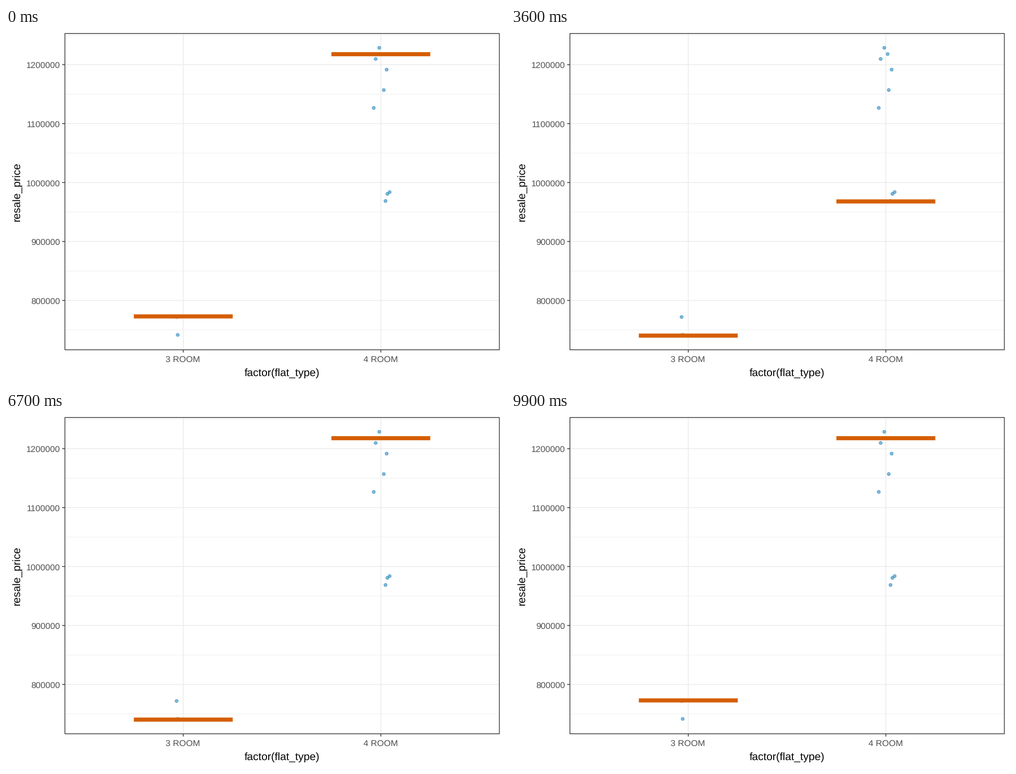
Animation of 885 by 632 pixels, one loop 10000 ms. Source, as a matplotlib script:

```python
import matplotlib.pyplot as plt
from matplotlib.animation import FuncAnimation
from matplotlib.patches import Circle, Rectangle

W, H, DPI = 885, 632, 64
PT = 72 / DPI  # points per pixel

plt.rcParams.update({
    "font.family": "Liberation Sans",
    "text.hinting": "none",
    "path.snap": False,
})

LEFT, RIGHT, TOP, BOTTOM = 104.5, 875.0, 9.7, 571.3
CENTERS = {"3 ROOM": 314.4, "4 ROOM": 664.8}
BAR_W, BAR_H = 175.4, 7.3
BLUE, ORANGE, DARK = "#0072B2", "#D55E00", "#333333"

POINTS = [
    (302.6, 513.0), (304.5, 544.8),
    (662.0, 35.2), (668.0, 46.3), (655.6, 54.9), (675.1, 73.9),
    (670.0, 110.2), (652.2, 141.8), (680.4, 291.3), (676.4, 294.5),
    (673.1, 307.1),
]

# Heights a bar can take, in pixels from the top
LEVELS3 = {"A": 512.0, "B": 546.1}
LEVELS4 = {"a": 35.6, "b": 46.5, "c": 54.4, "d": 75.4, "e": 112.0,
           "f": 143.3, "g": 290.6, "h": 307.9}
# One pair of draws per state
DRAWS = ("Ab Ad Bc Bc Ag Ae Af Aa Ab Bh Ba Be Bh "
         "Af Be Ae Aa Bb Ae Af Ac Be Be Af Bf").split()
STATES = [(LEVELS3[p], LEVELS4[q]) for p, q in DRAWS]


def price_y(price):
    return 65.1 + (1200000 - price) * 104.63 / 100000


fig = plt.figure(figsize=(W / DPI, H / DPI), dpi=DPI, facecolor="white")
ax = fig.add_axes([0, 0, 1, 1])
ax.set_xlim(0, W)
ax.set_ylim(H, 0)
ax.axis("off")


def line(x0, y0, x1, y1, color, width, z):
    ax.plot([x0, x1], [y0, y1], color=color, lw=width * PT, zorder=z,
            solid_capstyle="butt")


def label(x, y, text, size, color, **kw):
    ax.text(x, y, text, fontsize=size * PT, color=color, va="baseline",
            rotation_mode="anchor", zorder=6, **kw)


for price in range(750000, 1250001, 100000):
    y = price_y(price)
    line(LEFT, y, RIGHT, y, "#EBEBEB", 0.75, 1)

for price in range(800000, 1200001, 100000):
    y = price_y(price)
    line(LEFT, y, RIGHT, y, "#EBEBEB", 1.4, 1)
    line(99.6, y, LEFT, y, DARK, 1.35, 5)
    label(96.2, y + 6.0, str(price), 15.45, "#4D4D4D", ha="right")

for name, x in CENTERS.items():
    line(x, TOP, x, BOTTOM, "#EBEBEB", 1.4, 1)
    line(x, BOTTOM, x, 576.1, DARK, 1.35, 5)
    label(x - 0.4, 592.8, name, 15.45, "#4D4D4D", ha="center")

label(489.3, 618.2, "factor(flat_type)", 19.3, "black", ha="center")
label(25.0, 290.3, "resale_price", 19.3, "black", ha="center", rotation=90)

for xy in POINTS:
    ax.add_patch(Circle(xy, 2.85, facecolor=(BLUE, 0.5),
                        edgecolor=(BLUE, 0.5), lw=0.9 * PT, zorder=3))

ax.add_patch(Rectangle((LEFT, TOP), RIGHT - LEFT, BOTTOM - TOP, fill=False,
                       edgecolor=DARK, lw=1.3 * PT, zorder=5))

bars = [ax.add_patch(Rectangle((x - BAR_W / 2, 0), BAR_W, BAR_H, lw=0,
                               facecolor=ORANGE, zorder=4))
        for x in CENTERS.values()]


def update(frame):
    # Three held frames and one halfway; one hold is a frame shorter
    step = frame + (frame >= 50)
    i, phase = divmod(step, 4)
    now = STATES[i % len(STATES)]
    after = STATES[(i + 1) % len(STATES)]
    t = 0.5 if phase == 3 else 0.0
    for bar, y0, y1 in zip(bars, now, after):
        bar.set_y(y0 + (y1 - y0) * t - BAR_H / 2)
    return bars


anim = FuncAnimation(fig, update, frames=100, interval=100, repeat=True,
                     repeat_delay=0, init_func=lambda: update(0))
plt.show()
```
